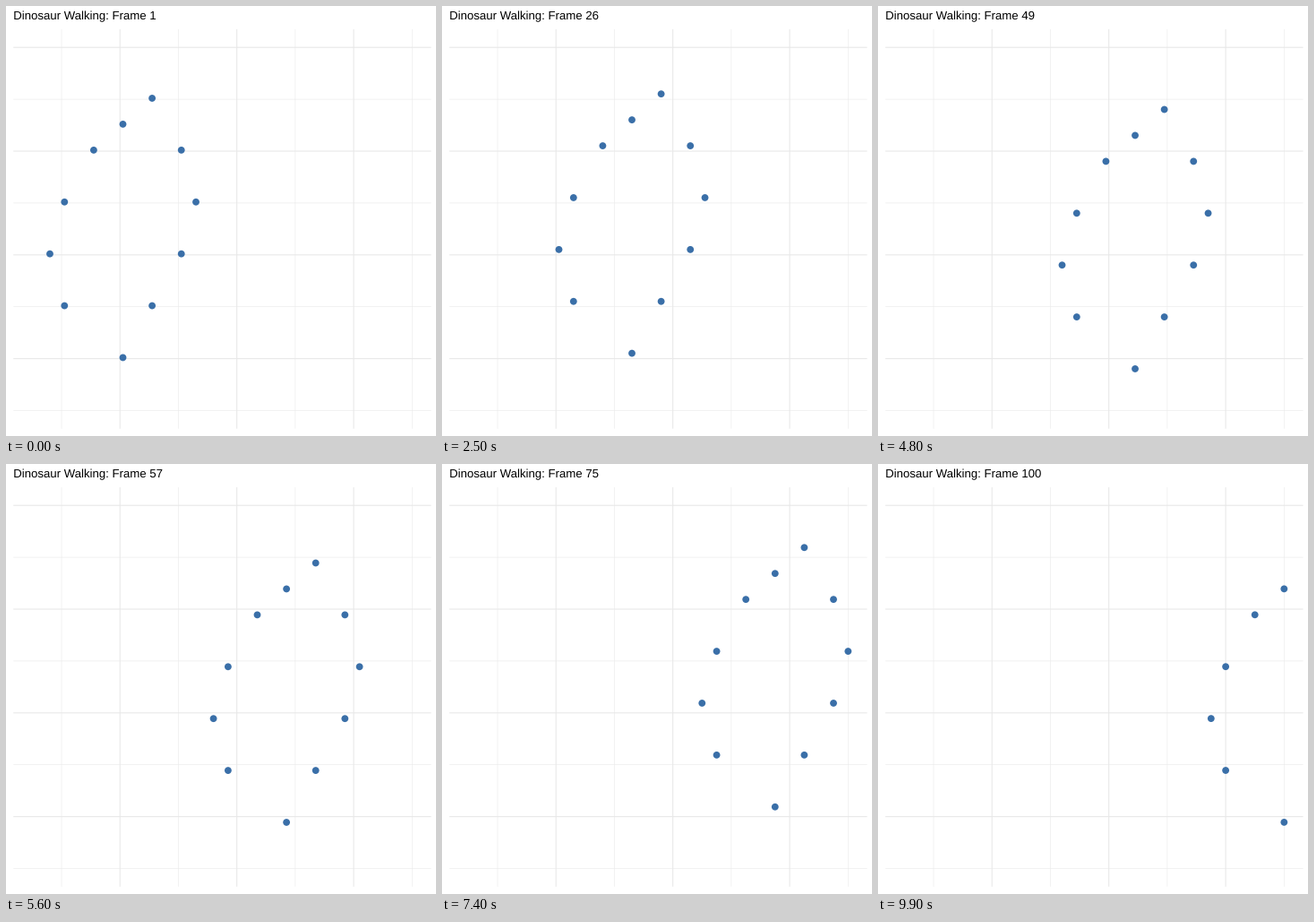
A matplotlib script for the animation above (10 s loop, 480x480 px).

```python
import math

import matplotlib.pyplot as plt
from matplotlib.animation import FuncAnimation
from matplotlib.patches import Circle, PathPatch
from matplotlib.textpath import TextPath
from matplotlib.transforms import Affine2D

SIZE, DPI = 480, 100
PX = 72 / DPI  # points per pixel
LEFT, RIGHT, TOP, BOTTOM = 8.22, 474.52, 25.95, 471.78
X_LIM, Y_LIM = (-3, 10), (-1, 6)
PAD = 0.05  # panel expansion beyond the limits
STEPS = 100


def body():
    """One flank, its half-turn about (0, 2.5), then the foot and head."""
    flank = list(zip((-2, -2.5, -2, -1), range(1, 5)))
    return flank + [(-x, 5 - y) for x, y in flank] + [(0, 0), (0, 4.5), (1, 5)]


def scale(v, lim, start, end):
    t = (v - lim[0]) / (lim[1] - lim[0])
    return start + (end - start) * (PAD + t) / (1 + 2 * PAD)


def to_x(v):
    return scale(v, X_LIM, LEFT, RIGHT)


def to_y(v):
    return scale(v, Y_LIM, BOTTOM, TOP)


def grid(xs, ys, width):
    style = dict(color="#e8e8e8", lw=width * PX, solid_capstyle="butt",
                 snap=False)
    for y in ys:
        ax.plot([LEFT, RIGHT], [to_y(y)] * 2, **style)
    for x in xs:
        ax.plot([to_x(x)] * 2, [TOP, BOTTOM], **style)


def text_path(text):
    # Outlined glyphs keep fractional letter spacing.
    path = TextPath((0, 0), text, size=13.2, prop={"family": "Liberation Sans"})
    return Affine2D().scale(1, -1).translate(8.22, 15).transform_path(path)


fig = plt.figure(figsize=(SIZE / DPI, SIZE / DPI), dpi=DPI, facecolor="white")
ax = fig.add_axes([0, 0, 1, 1])
ax.set(xlim=(0, SIZE), ylim=(SIZE, 0))
ax.axis("off")

grid(range(-2, 11, 4), range(-1, 6, 2), 0.53)
grid(range(0, 9, 4), range(0, 7, 2), 1.07)

points = body()
dots = [ax.add_patch(Circle((0, 0), 3.9, fc="#3a6fa8", lw=0, zorder=3))
        for _ in points]
title = ax.add_patch(PathPatch(text_path("Dinosaur"), fc="black", lw=0,
                               snap=False))


def update(i):
    step = i + 1
    dx, dy = step / 10, 0.2 * math.sin(step / 10)
    for dot, (x, y) in zip(dots, points):
        dot.center = to_x(x + dx), to_y(y + dy)
        dot.set_visible(x + dx <= X_LIM[1] + 1e-9)
    title.set_path(text_path(f"Dinosaur Walking: Frame {step}"))
    return [*dots, title]


anim = FuncAnimation(fig, update, frames=STEPS, interval=100, repeat=True,
                     repeat_delay=0)
plt.show()
```
